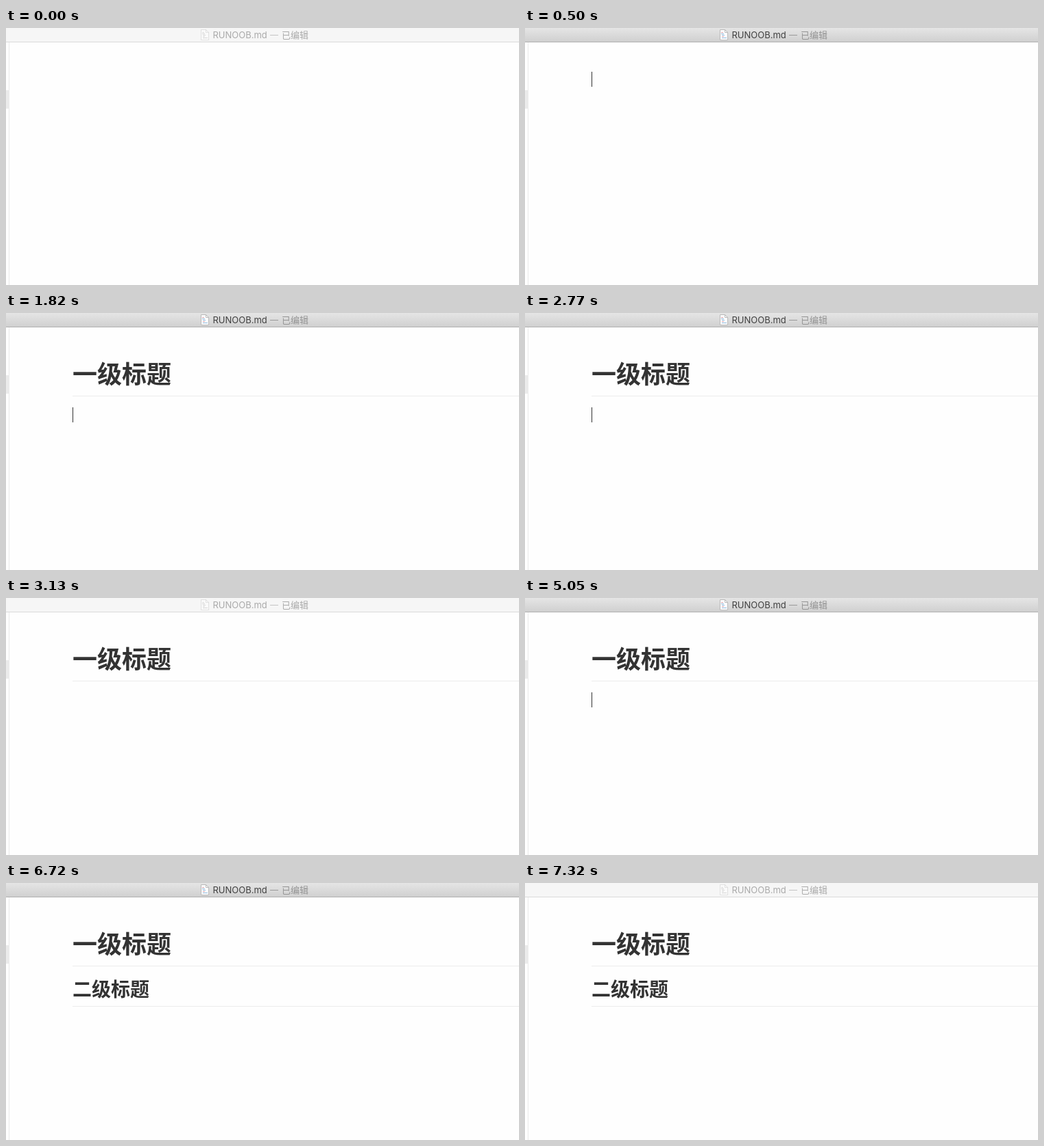
Recreate the animation shown at these times as an HTML page with a canvas. Size 748 px wide and 376 px high, loop 8 s.

```html
<!DOCTYPE html>
<html lang="zh-CN">
<head>
<meta charset="utf-8">
<title>Markdown headings</title>
<style>
  html, body { margin: 0; width: 100%; height: 100%; overflow: hidden; background: #fefefe; }
  canvas { display: block; }
</style>
</head>
<body>
<canvas id="stage" width="748" height="376"></canvas>
<script>
const ctx = document.getElementById("stage").getContext("2d");
const WIDTH = 748, HEIGHT = 376, LOOP = 8000, MARGIN = 97;
const CJK = '"Open Sans", "Noto Sans CJK SC", sans-serif';
const UI = 'Inter, "Noto Sans CJK SC", sans-serif';

const within = (t, from, to) => t >= from && t < to;

function rect(x, y, w, h, color) {
  ctx.fillStyle = color;
  ctx.fillRect(x, y, w, h);
}

function text(str, x, y, font, color) {
  ctx.font = font;
  ctx.fillStyle = color;
  ctx.fillText(str, x, y);
  return ctx.measureText(str).width;
}

function documentIcon(active) {
  ctx.save();
  ctx.globalAlpha = active ? 1 : 0.45;
  ctx.beginPath();
  ctx.moveTo(284.5, 2.5);
  ctx.lineTo(291.5, 2.5);
  ctx.lineTo(295.5, 6.5);
  ctx.lineTo(295.5, 17.5);
  ctx.lineTo(284.5, 17.5);
  ctx.closePath();
  ctx.fillStyle = "#fff";
  ctx.fill();
  ctx.strokeStyle = active ? "#b8b8b8" : "#c4c4c4";
  ctx.lineWidth = 1;
  ctx.stroke();
  ctx.beginPath();
  ctx.moveTo(291.5, 2.5);
  ctx.lineTo(291.5, 6.5);
  ctx.lineTo(295.5, 6.5);
  ctx.stroke();
  const blue = active ? "#8fb9dc" : "#aaa";
  const pink = active ? "#dfa3ad" : "#b4b4b4";
  rect(286, 6, 3, 1, pink);
  rect(286, 8, 4, 1, blue);
  rect(287, 10, 4, 1, blue);
  rect(287, 12, 3, 1, pink);
  rect(287, 14, 7, 1, blue);
  ctx.restore();
}

function titleBar(active) {
  const fill = ctx.createLinearGradient(0, 0, 0, 20);
  fill.addColorStop(0, active ? "#e5e5e5" : "#f6f6f6");
  fill.addColorStop(1, active ? "#d0d0d0" : "#f6f6f6");
  rect(0, 0, WIDTH, 20, fill);
  rect(0, 20, WIDTH, 1, active ? "#b0b0b0" : "#dadada");
  documentIcon(active);
  text("RUNOOB.md", 301.5, 15, "13px " + UI, active ? "#404040" : "#aaa");
  rect(385, 10, 12, 1, active ? "#999" : "#c4c4c4");
  text("已编辑", 402, 15.4, "13px " + UI, active ? "#939393" : "#aaa");
}

function sidebar() {
  rect(4, 21, 1, HEIGHT - 21, "#e9e9e9");
  rect(0, 91, 5, 27, "#ebebeb");
}

function sourceLine(marks, title, baseline) {
  const font = "bold 16px " + CJK;
  const offset = text(marks + " ", MARGIN, baseline, font, "#ccc");
  text(title, MARGIN + offset, baseline, font, "#333");
}

function heading(title, size, baseline, ruleY) {
  text(title, MARGIN, baseline, `bold ${size}px ${CJK}`, "#333");
  rect(MARGIN, ruleY, WIDTH - MARGIN, 1, "#ececec");
}

function caret(x, y, h) {
  rect(x, y, 1, h, "#333");
}

function draw(t) {
  rect(0, 0, WIDTH, HEIGHT, "#fefefe");
  sidebar();
  titleBar(within(t, 500, 3130) || within(t, 5050, 7320));

  if (within(t, 980, 1820)) sourceLine("#", "一级标题", 82.4);
  if (t >= 1820) heading("一级标题", 36, 102.5, 121);
  if (within(t, 5520, 6240)) sourceLine("##", "二级标题", 156.4);
  if (t >= 6240) heading("二级标题", 28, 166.4, 180);

  if (within(t, 500, 980)) caret(MARGIN, 64, 22);
  if (within(t, 980, 1460)) caret(176, 64, 23);
  if (within(t, 1820, 2290) || within(t, 2770, 3130) || within(t, 5050, 5520)) caret(MARGIN, 138, 22);
  if (within(t, 5520, 6000)) caret(186, 138, 23);
  if (within(t, 6240, 6720)) caret(MARGIN, 197, 22);
}

const start = performance.now();
function frame() {
  draw((performance.now() - start) % LOOP);
  requestAnimationFrame(frame);
}
frame();
</script>
</body>
</html>
```
